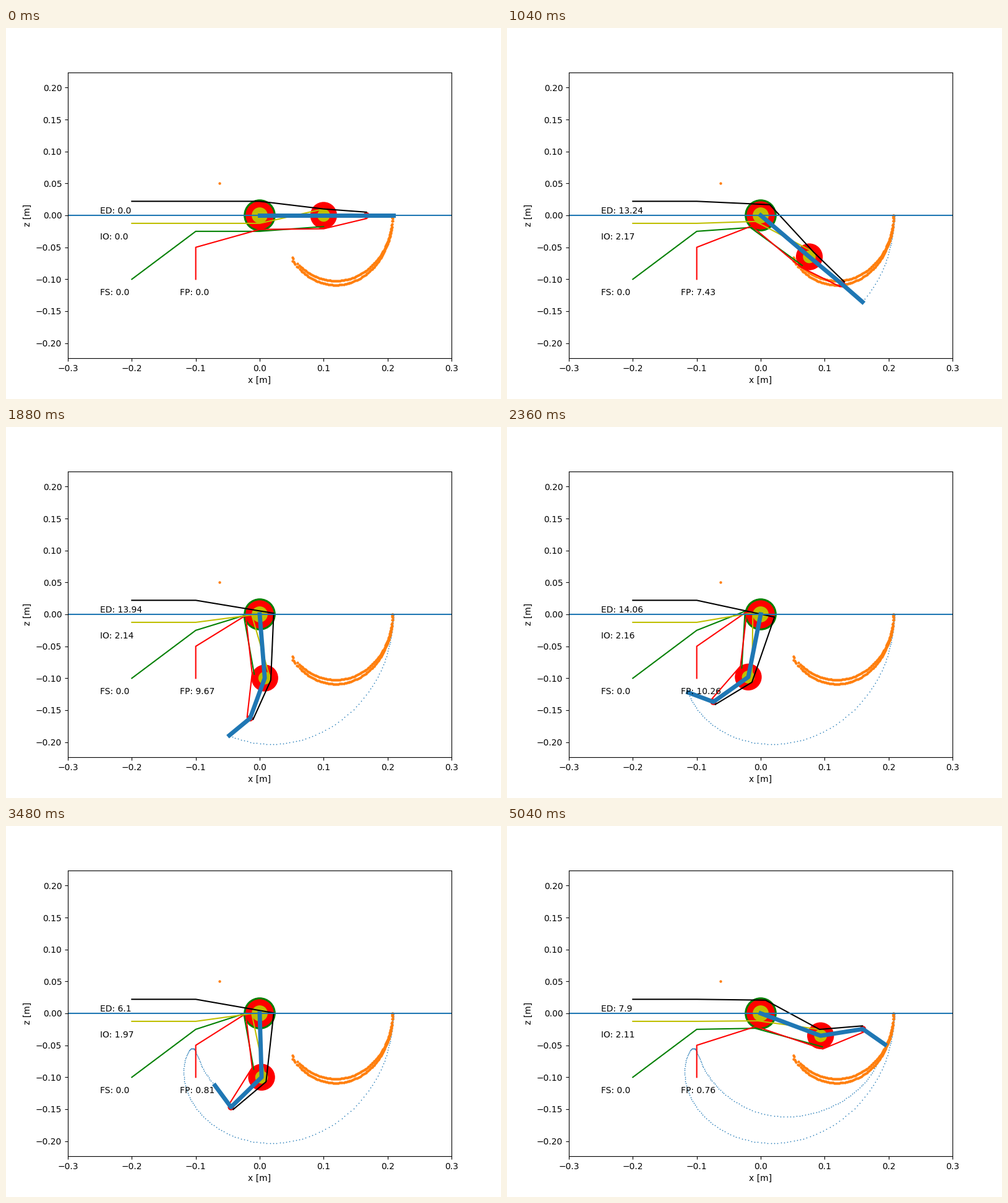
Animation, 800 px wide and 600 px high, one loop 5080 ms. Source, as a matplotlib script:

```python
import numpy as np
import matplotlib.pyplot as plt
from matplotlib.animation import FuncAnimation
from matplotlib.patches import Circle

FRAMES, INTERVAL = 127, 40
TURN = 73  # last frame of the flexing stroke
LINKS = np.array([0.1, 0.067, 0.042])
rng = np.random.default_rng(4)

# Key poses: joint angles in degrees
KEYS = np.array([0, 15, 36, 59, TURN, 87, 104, 126])
BENDS = [(0, -15.7, -64.7, -101.2, -106, -88.3, -47.8, -20.5),
         (0, 8.2, -11.5, -43.3, -74.5, -47.3, -11.2, 29.5),
         (0, 1.7, -9.5, -56, -75.7, -98, -80.5, -44)]


def smooth(values, at):
    """Cubic Hermite curve through the key poses, starting at rest."""
    values = np.array(values)
    slope = np.gradient(values, KEYS)
    slope[0] = 0
    i = np.clip(np.searchsorted(KEYS, at, "right") - 1, 0, len(KEYS) - 2)
    h = KEYS[i + 1] - KEYS[i]
    u = (at - KEYS[i]) / h
    return ((1 + 2 * u) * (1 - u) ** 2 * values[i] + u * (1 - u) ** 2 * h * slope[i]
            + u * u * (3 - 2 * u) * values[i + 1] + u * u * (u - 1) * h * slope[i + 1])


def stroke(frames, forces):
    """One parabola per tendon force over a stroke."""
    fits = [np.polyfit(frames, f, 2) for f in forces]
    return lambda n: [float(np.polyval(fit, n)) for fit in fits]


# Forces of ED, IO and FP in both strokes
flex = stroke(KEYS[1:4], [(12.62, 13.65, 14.06), (2.21, 2.15, 2.16), (5.63, 8.69, 10.26)])
extend = stroke(KEYS[5:], [(6.1, 7.31, 7.9), (1.97, 2.03, 2.11), (0.81, 1.03, 0.76)])


def forces_at(n):
    if n == 0:
        return [0.0] * 3
    return flex(n) if n <= TURN else extend(n)


def sweep(a, b, end):
    """Elliptic arc of dots that thins out at both ends."""
    phi = np.linspace(-1.5, end, 115)
    dense = (phi > 10) & (phi < 130)
    phi = np.radians(phi[dense | (rng.random(phi.size) < 0.55)])
    return np.column_stack([0.119 + a * np.cos(phi), -b * np.sin(phi)])


def normal(angle, r):
    return np.array([-r * np.sin(angle), r * np.cos(angle)])


# Two trail samples per frame
times = np.arange(2 * FRAMES - 1) / 2
angles = np.radians(np.cumsum([smooth(b, times) for b in BENDS], axis=0)).T
segments = np.stack([np.cos(angles), np.sin(angles)], axis=2) * LINKS[:, None]
joints = np.pad(np.cumsum(segments, axis=1), ((0, 0), (1, 0), (0, 0)))

fig, ax = plt.subplots(figsize=(8, 6), dpi=100)
ax.set(xlim=(-0.3, 0.3), ylim=(-0.22355, 0.22355), xlabel="x [m]", ylabel="z [m]")
trail, = ax.plot([], [], "o", color="C0", ms=1.2, mew=0, zorder=1)
recorded = np.vstack([(-0.0625, 0.05), sweep(0.089, 0.109, 143), sweep(0.0885, 0.1025, 140)])
ax.plot(*recorded.T, "o", color="C1", ms=3.1, mew=0, zorder=1)

# Pulleys: joint index, radius, colour
pulleys = []
for joint, r, color in [(0, 0.025, "g"), (0, 0.022, "r"), (0, 0.0125, "y"),
                        (1, 0.021, "r"), (1, 0.01, "y"), (2, 0.005, "r")]:
    disc = Circle((0, 0), r, fc=color, ec="none")
    pulleys.append((joint, ax.add_patch(disc)))

# Tendons: colour, fixed points, signed lever arm at each joint
tendons = [
    (ax.plot([], [], color)[0], fixed, arms) for color, fixed, arms in [
        ("g", [(-0.2, -0.1), (-0.1, -0.025)], (-0.025, -0.0175)),
        ("r", [(-0.1, -0.1), (-0.1, -0.05)], (-0.022, -0.021, -0.005)),
        ("y", [(-0.2, -0.0125), (-0.1, -0.0125)], (-0.0125, 0.01)),
        ("k", [(-0.2, 0.022), (-0.1, 0.022)], (0.022, 0.01, 0.005)),
    ]
]
ax.axhline(0, color="C0")
finger, = ax.plot([], [], color="C0", lw=5)

ax.text(-0.25, -0.125, "FS: 0.0")
labels = [(name, ax.text(x, z, "")) for name, x, z in
          [("ED", -0.25, 0.003), ("IO", -0.25, -0.0375), ("FP", -0.125, -0.125)]]


def update(n):
    pose = joints[2 * n]
    # Each tendon wraps the first joint by link one, later ones by link two
    turn = angles[2 * n, [0, 1, 1]]
    for joint, disc in pulleys:
        disc.center = pose[joint]
    for line, fixed, arms in tendons:
        wrapped = [pose[j] + normal(turn[j], r) for j, r in enumerate(arms)]
        line.set_data(*np.vstack([fixed, wrapped]).T)
    trail.set_data(*joints[:2 * n + 1, 3].T)
    finger.set_data(*pose.T)
    for (name, label), force in zip(labels, forces_at(n)):
        label.set_text(f"{name}: {round(force, 2)}")


anim = FuncAnimation(fig, update, frames=FRAMES, init_func=lambda: update(0),
                     interval=INTERVAL, repeat=True)
plt.show()
```
